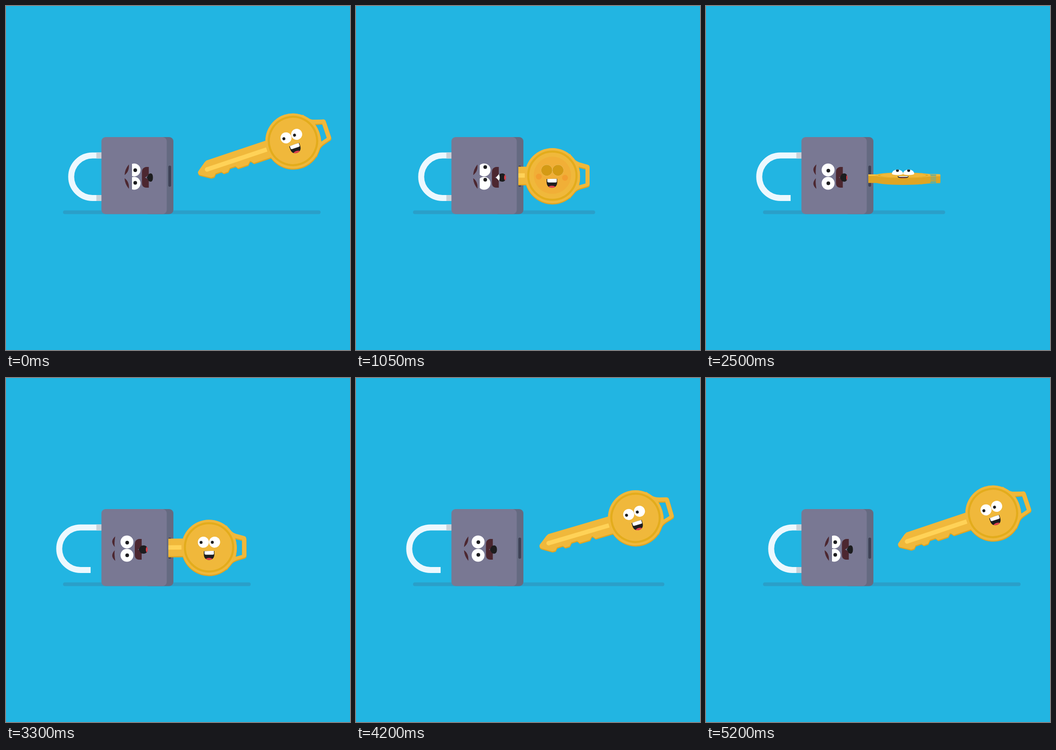
An HTML page for the animation above (5.3 s loop, 748x748 px).

```html
<!DOCTYPE html>
<html lang="en">
<head>
<meta charset="utf-8">
<title>Lock and key</title>
<style>
  html, body { margin: 0; width: 100%; height: 100%; overflow: hidden; background: #22b5e2; }
  svg { display: block; width: 100vw; height: 100vh; }
  .gold { fill: #f0b83b; }
  .side { fill: #dfa524; }
  .brown { fill: #4c2730; }
  .ink { fill: #1d1d1f; }
  .white { fill: #fff; }
  .tongue { fill: #e0434e; }
  .steel { fill: none; stroke: #ecf8fe; stroke-width: 13; }
  .grey { fill: #c9d2d9; }
</style>
</head>
<body>
<svg viewBox="0 0 748 748">
  <defs>
    <g id="keyShape">
      <circle r="60"/>
      <path d="M-45-19.500H-192l-5 2.500-19 14q-3 3-1 7l2 2 21 13h7l5-5.500h13l4 5h10l6-6.500h13l4 6h23l6-6h2l5 6.500h51Z"/>
      <path fill-rule="evenodd" d="M38-48C48-34 52-31 62-28L76-24Q81-23 81-18V17Q81 22 76 23L62 27C52 30 48 34 38 48ZM57-20Q63 0 57.500 21L72 17V-16Z"/>
    </g>
    <path id="upperTeeth" d="M-10 6H10.500V14Q10.500 16 8 16H-7Q-9.500 16-10 14Z"/>
    <clipPath id="keyRoom"><rect x="353" width="395" height="748"/></clipPath>
    <clipPath id="keyMouthClip"><path id="keyMouth" d="M-11.500 8.500Q0 7.500 11.500 8V15C11.500 23 7 27.500 0 27.500S-11.500 23-11.500 15Z"/></clipPath>
    <clipPath id="keyEyeClip"><path id="keyEye"/></clipPath>
    <clipPath id="lidClip"><rect id="lid" y="330" width="60" height="90"/></clipPath>
    <clipPath id="mouthClip"><path id="mouth"/></clipPath>
    <path id="brow"/>
  </defs>

  <rect width="748" height="748" fill="#22b5e2"/>
  <rect id="ground" x="124" y="444.500" height="8" rx="4" fill="#2a9fc9"/>

  <path id="shackle" class="steel" d="M240 325H188A46.250 46.250 0 0 0 188 417.500H210"/>
  <rect class="grey" x="196.500" y="318.500" width="12" height="13"/>
  <rect id="lowShade" class="grey" x="196.500" y="411" height="13"/>
  <rect x="300" y="285" width="64" height="167.500" rx="9" fill="#656a81"/>
  <rect x="207.500" y="285" width="142" height="167.500" rx="9" fill="#797893"/>
  <rect x="353" y="347" width="6" height="46" rx="3" fill="#3e4256"/>

  <g id="lockFace">
    <use href="#brow" class="brown"/>
    <use href="#brow" class="brown" transform="translate(0 742) scale(1 -1)"/>
    <g clip-path="url(#lidClip)">
      <circle class="white" cx="278.500" cy="356.500" r="14"/>
      <circle class="white" cx="278.500" cy="385.500" r="14"/>
      <g id="pupils" class="ink">
        <circle cx="278.500" cy="357" r="4"/>
        <circle cx="278.500" cy="384.500" r="4"/>
      </g>
    </g>
    <path class="brown" d="M310.500 350H304Q295.500 352 295.500 361V385Q295.500 394 304 395H310.500V379Q308 375 302 373Q308 370 310.500 366Z"/>
    <use href="#mouth" class="ink"/>
    <g clip-path="url(#mouthClip)"><ellipse id="tongue" class="tongue" cy="373" ry="7"/></g>
    <path id="teeth" class="white" d="M304.500 373L311 365.500Q314 373 311 380Z"/>
  </g>

  <g clip-path="url(#keyRoom)">
    <g id="key">
      <g id="edge" class="side"></g>
      <g id="top">
        <use href="#keyShape" class="gold"/>
        <path d="M-198-.500H-60" stroke="#ffd257" stroke-width="9.500"/>
        <circle cx="-197" cy="-.500" r="4.750" fill="#ffd257"/>
        <circle r="52.500" fill="none" stroke="#e3ac1c" stroke-width="4.500"/>
        <circle id="tint" cy="-1" r="40.500" fill="#f09a30"/>
        <g id="cheeks" fill="#f58424">
          <circle cx="-29.500" cy="2" r="6.500"/>
          <circle cx="27.500" cy="4.500" r="6.500"/>
        </g>
      </g>
      <g id="eyes">
        <g class="eye"></g>
        <g class="eye"></g>
      </g>
      <g id="keyMouthBox">
        <use href="#keyMouth" class="ink"/>
        <g clip-path="url(#keyMouthClip)">
          <ellipse class="tongue" cy="27.500" rx="8.500" ry="4.500"/>
          <use href="#upperTeeth" class="white"/>
          <g id="clench" fill="#fde8e2">
            <use href="#upperTeeth"/>
            <ellipse cy="22.500" rx="9.500" ry="5.500"/>
          </g>
        </g>
      </g>
    </g>
  </g>
</svg>
<script>
const LOOP = 5300, STEP = 50, LAYERS = 8;
const $ = id => document.getElementById(id);
const set = (id, attrs) => {
  for (const name in attrs) $(id).setAttribute(name, attrs[name]);
};
const mix = (a, b, u) => a + (b - a) * u;
const progress = (t, from, to) => Math.min(1, Math.max(0, (t - from) / (to - from)));
const smooth = u => u * u * (3 - 2 * u);
// Quick start, long soft landing.
const glide = u => 1 - (1 - u ** 1.6) ** 3;
// Rises over a..b, falls over c..d.
const pulse = (t, a, b, c, d) => smooth(progress(t, a, b)) - smooth(progress(t, c, d));

function drawLock(t) {
  const shock = pulse(t, 250, 550, 1150, 1350);
  const angry = pulse(t, 1150, 1350, 2150, 2350);
  const relaxed = pulse(t, 2150, 2350, 4500, 4950);
  const joy = pulse(t, 2150, 2350, 3450, 3950);
  const thrill = pulse(t, 2850, 3100, 3450, 3950);

  set("lockFace", { transform: `translate(${-13 * relaxed - 2.5 * thrill} 0)` });
  set("lid", { x: 274 - 5 * shock - 11.5 * relaxed });
  const lookX = 2.5 - 1.5 * angry - 2 * relaxed;
  const lookY = -6.7 * shock + 6.7 * angry + joy;
  set("pupils", { transform: `translate(${lookX} ${lookY})` });

  const mid = 262.5 - 3 * shock - angry - 10 * relaxed;
  const tilt = 4.7 - 8.7 * angry - 4.2 * joy;
  const arch = 4 * angry + 8 * joy;
  set("brow", { d: `M${mid + tilt} 344.5Q${mid - 4 - arch} 355 ${mid - tilt} 367.5Q${mid + 6 - arch} 360 ${mid + tilt} 344.5Z` });

  const left = 306 + 2 * shock - 3.5 * angry - 2 * relaxed;
  const right = 319.5 + 6.5 * shock - 4 * angry + joy + 3 * thrill;
  set("mouth", { d: `M${left} 373L${left + 4} 366C${left + 7} 363 ${right} 362 ${right} 373S${left + 7} 383 ${left + 4} 380Z` });
  set("tongue", { cx: right, rx: 4 * shock + 2.5 * joy + 1.5 * thrill });
  set("teeth", { opacity: shock });

  const slide = 26 * pulse(t, 2230, 2400, 4480, 4700);
  set("shackle", { transform: `translate(${-slide} 0)` });
  set("lowShade", { width: Math.max(0, Math.min(12, 13.5 - slide)) });
}

function drawKey(t) {
  const away = 1 - glide(progress(t, 0, 970)) + glide(progress(t, 3150, 4650));
  const flat = pulse(t, 2120, 2400, 2800, 3050);
  const shut = pulse(t, 620, 740, 2180, 2280);
  const effort = pulse(t, 700, 1500, 2150, 2350);
  const clench = pulse(t, 1150, 1300, 2100, 2200);

  const x = 427 + 197 * away + 1.5 * flat;
  const y = 369 - 75.5 * away ** 1.75 - flat + clench * Math.sin((t - 2000) / 45);
  set("key", { transform: `translate(${x} ${y}) rotate(${-18.5 * away ** 1.4})` });
  set("ground", { width: 396 + 164 * away });

  const squash = 1 - .9 * flat;
  const depth = 2.5 + 12.5 * Math.sqrt(1 - squash ** 2);
  layers.forEach((el, i) =>
    el.setAttribute("transform", `translate(0 ${depth * (1 - i / LAYERS)}) scale(1 ${squash})`));
  set("top", { transform: `scale(1 ${squash})` });
  set("tint", { opacity: .75 * effort });
  set("cheeks", { opacity: .95 * effort });
  set("clench", { opacity: clench });

  // The face stands out from the disc, so it flattens less.
  set("keyEye", { d: `M-12 0A12 ${mix(12, 9.5, flat)} 0 0 1 12 0A12 ${mix(12, 2.5, flat)} 0 0 1-12 0Z` });
  set("eyes", { transform: `translate(0 ${mix(-11.2, -3, flat) - .5 * shut})` });
  for (const eye of eyes) {
    const pupil = eye.querySelector(".ink");
    pupil.setAttribute("cx", mix(-5, 0, flat));
    pupil.setAttribute("cy", mix(.3, -7.5, flat));
    eye.querySelector(".shut").setAttribute("opacity", shut);
  }
  set("keyMouthBox", { transform: `translate(${-shut} ${-1.2 * shut}) scale(1 ${mix(1, .23, flat)})` });
}

$("edge").innerHTML = '<use href="#keyShape"/>'.repeat(LAYERS);
const layers = [...$("edge").children];
const eyes = [...document.querySelectorAll(".eye")];
eyes.forEach((eye, i) => {
  eye.setAttribute("transform", `translate(${i ? 12.2 : -12.2} 0)`);
  eye.innerHTML = `<use href="#keyEye" class="white"/>
    <g clip-path="url(#keyEyeClip)"><circle class="ink" r="3.2"/></g>
    <use href="#keyEye" class="shut" fill="#d49a14"/>`;
});

function frame() {
  const t = Math.floor(performance.now() % LOOP / STEP) * STEP;
  drawLock(t);
  drawKey(t);
  requestAnimationFrame(frame);
}
frame();
</script>
</body>
</html>
```
